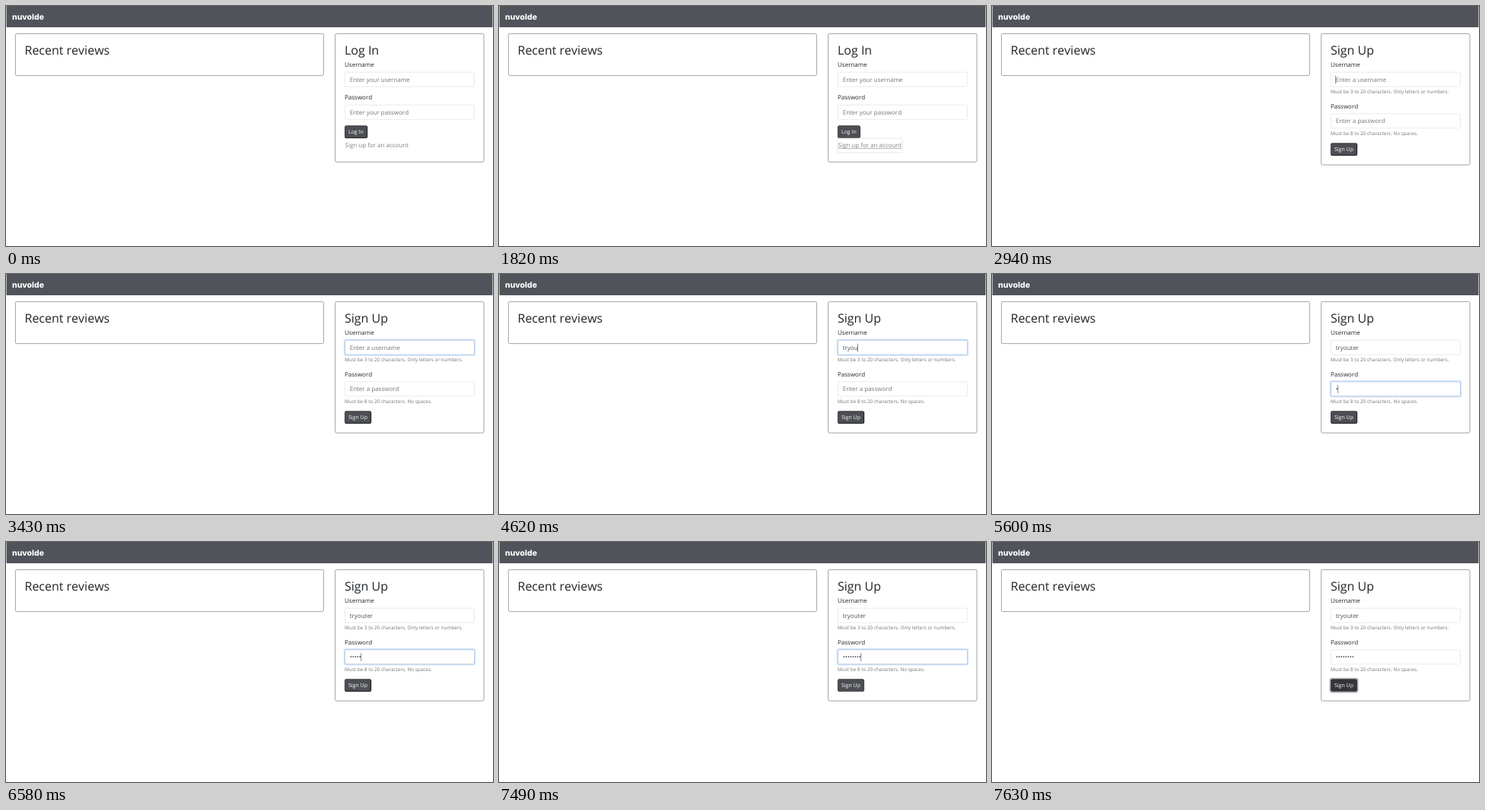
An HTML page for the animation above (8 s loop, 640 by 316 pixels).

```html
<!DOCTYPE html>
<html lang="en">
<head>
<meta charset="utf-8">
<title>Sign up</title>
<style>
  html, body { margin: 0; width: 100%; height: 100%; overflow: hidden; background: #fff; }
  svg { display: block; width: 640px; height: 316px; }
  text { font: 8px "Open Sans", sans-serif; font-kerning: none; fill: #212529; text-rendering: geometricPrecision; }
  .brand { font: 800 10.5px Inter, sans-serif; fill: #fff; }
  .title { font-size: 16px; }
  .hint { font-size: 6.4px; fill: #707479; }
  .ghost { fill: #6f757b; }
  .link { fill: #808080; }
  .value { fill: #495057; }
  .btn { font-size: 7px; font-weight: 500; fill: #fff; }
  .card { fill: #fff; stroke: #8c8c8e; stroke-width: .8; }
  .box { fill: #fff; stroke: #e0e3e6; stroke-width: .7; }
  .caret { stroke: #333; stroke-width: .6; }
</style>
</head>
<body>
<svg id="stage" viewBox="0 0 640 316"></svg>
<script>
const LOOP = 8000, TICK = 70;
const USER = "tryouter";
const userKeys = [[3920, 1], [4060, 2], [4130, 3], [4200, 4], [4620, 5], [4760, 6], [4830, 8]];
const passKeys = [5600, 5880, 6160, 6300, 6580, 6790, 7000, 7140].map((t, i) => [t, i + 1]);

const stage = document.getElementById("stage");

function add(parent, tag, attrs, content) {
  const el = document.createElementNS("http://www.w3.org/2000/svg", tag);
  for (const key in attrs) el.setAttribute(key, attrs[key]);
  if (content) el.textContent = content;
  parent.append(el);
  return el;
}
const label = (parent, x, y, content, cls = "") => add(parent, "text", { x, y, class: cls }, content);
const rect = (parent, x, y, width, height, attrs) => add(parent, "rect", { x, y, width, height, ...attrs });
const card = (parent, x, width, height) => rect(parent, x, 36.4, width, height, { class: "card", rx: 1.8 });
const show = (el, on) => { el.style.visibility = on ? "inherit" : "hidden"; };

function field(parent, y, hint) {
  const ring = rect(parent, 444.5, y - .7, 171.9, 20.8, { rx: 2.4, fill: "none", stroke: "#d3e4f7", "stroke-width": 1.6 });
  rect(parent, 445.4, y + .2, 170.1, 19, { class: "box", rx: 1.8 });
  const edge = rect(parent, 445.4, y + .2, 170.1, 19, { rx: 1.8, fill: "none", stroke: "#a4c3e6", "stroke-width": .7 });
  const ghost = label(parent, 451.7, y + 12.7, hint, "ghost");
  const value = label(parent, 451.7, y + 12.7, "", "value");
  const caret = add(parent, "line", { y1: y + 4.6, y2: y + 15.4, class: "caret" });
  return (content, focus, caretOn) => {
    ring.style.opacity = edge.style.opacity = focus;
    show(ghost, !content);
    if (value.textContent !== content) value.textContent = content;
    const x = 451.6 + (content ? value.getComputedTextLength() : 0);
    caret.setAttribute("x1", x);
    caret.setAttribute("x2", x);
    show(caret, caretOn);
  };
}

function button(parent, y, width, content) {
  const ring = rect(parent, 444.2, y - 1, width + 1.6, 18.2, { rx: 2.2, fill: "none", stroke: "#bcbdc0", "stroke-width": 1.7 });
  const body = rect(parent, 445.4, y + .2, width - .8, 15.8, { rx: 1.6, "stroke-width": .8 });
  const bevel = add(parent, "path", {
    d: `M445.8 ${y + 16}H${443.4 + width}q1.2 0 1.2 -1.2V${y + .8}`,
    fill: "none", stroke: "#1b1c1f", "stroke-width": .9
  });
  label(parent, 450, y + 10.8, content, "btn");
  return (raised, pressed) => {
    ring.style.opacity = pressed;
    bevel.style.opacity = raised;
    body.style.fill = pressed ? `rgb(${76 - 24 * pressed},${78 - 25 * pressed},${83 - 26 * pressed})` : "#4c4e53";
    body.style.stroke = "#2c2d31";
  };
}

// Page frame
rect(stage, .6, 0, 638.8, 28, { fill: "#50535a" });
label(stage, 8, 18, "nuvolde", "brand");
card(stage, 12.4, 405, 55.2);
label(stage, 24.5, 64, "Recent reviews", "title");

// Log in form
const login = add(stage, "g");
card(login, 432.6, 195.4, 169);
label(login, 445, 64, "Log In", "title");
label(login, 445, 80.4, "Username");
field(login, 87, "Enter your username")("", 0, false);
label(login, 445, 123.4, "Password");
field(login, 130.2, "Enter your password")("", 0, false);
const loginButton = button(login, 157.6, 30, "Log In");
label(login, 445.5, 186.4, "Sign up for an account", "link");
const underline = rect(login, 445.5, 187.2, 84, .6, { fill: "#808080" });
const outline = rect(login, 444.8, 174.2, 85.4, 19, { rx: 1.8, fill: "none", stroke: "#dcdde0", "stroke-width": .7 });

// Sign up form
const signup = add(stage, "g");
card(signup, 432.6, 195.4, 172.8);
label(signup, 445, 64, "Sign Up", "title");
label(signup, 445, 80.4, "Username");
const userField = field(signup, 87, "Enter a username");
label(signup, 445, 115.4, "Must be 3 to 20 characters. Only letters or numbers.", "hint");
label(signup, 445, 134.9, "Password");
const passField = field(signup, 141.6, "Enter a password");
label(signup, 445, 170, "Must be 8 to 20 characters. No spaces.", "hint");
const signButton = button(signup, 180.6, 35, "Sign Up");

const typed = (keys, t) => keys.reduce((n, [at, count]) => t >= at ? count : n, 0);
const within = (t, a, b) => t >= a && t < b;
const fade = (t, at) => {
  const n = Math.floor((t - at) / TICK);
  return n <= 0 ? 0 : n === 1 ? .65 : 1;
};

function render(t) {
  const joined = t >= 1890;
  show(login, !joined);
  show(signup, joined);
  loginButton(t < 210 ? 1 : 0, 0);
  show(underline, t >= 1400 && !joined);
  show(outline, t >= 1820 && !joined);

  const leave = fade(t, 7490);
  userField(USER.slice(0, typed(userKeys, t)), fade(t, 2940) - fade(t, 5180),
    within(t, 2940, 3430) || within(t, 3920, 5180));
  passField("•".repeat(typed(passKeys, t)), fade(t, 5180) * (1 - leave), within(t, 5180, 7560));
  signButton(t < 7420 ? 1 : t < 7490 ? .5 : 0, leave);
}

function loop() {
  render(performance.now() % LOOP);
  requestAnimationFrame(loop);
}
loop();
</script>
</body>
</html>
```
